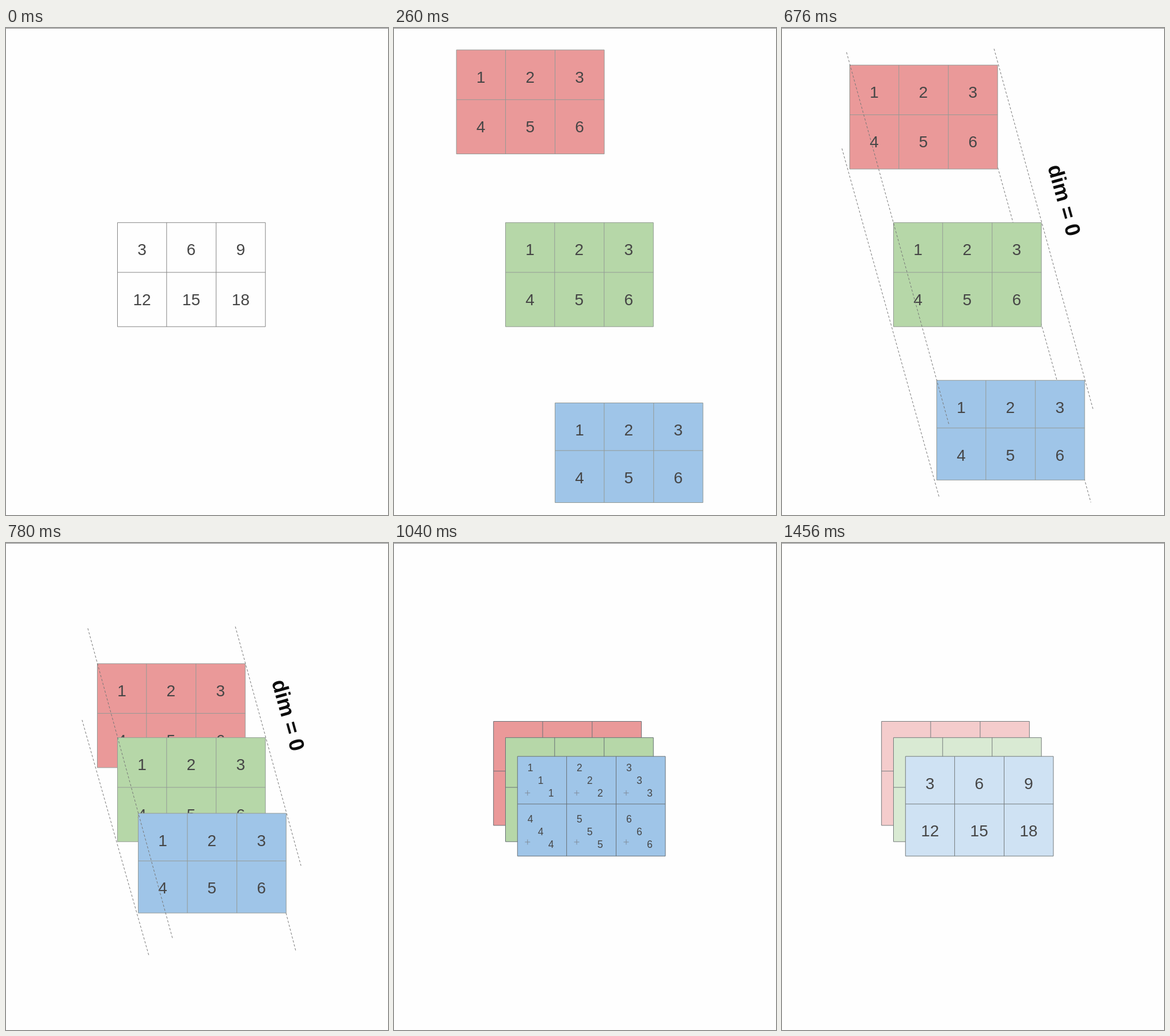
Recreate the animation shown at these times as an HTML page. Size 663x845 px, loop 1.56 s.

```html
<!DOCTYPE html>
<html lang="en">
<head>
<meta charset="utf-8">
<title>Sum over dim 0</title>
<style>
  html, body { margin: 0; width: 100%; height: 100%; overflow: hidden; background: #fefefe; }
  svg { display: block; width: 663px; height: 845px; }
  text { font: 28px "Liberation Sans", Arial, sans-serif; text-anchor: middle; fill: #464646; }
  .small { font-size: 17.5px; }
  .plus { stroke: #7f8c9a; stroke-width: 1; }
  .label { font-size: 36.5px; font-weight: bold; fill: #0c0c0c; }
  .dash { stroke: #777; stroke-width: 1; stroke-dasharray: 4 3; }
  .scene { visibility: hidden; animation: hold260 1560ms step-end infinite; }
  .scene.short { animation-name: hold130; }
  @keyframes hold260 { 0% { visibility: visible; } 16.6667%, 100% { visibility: hidden; } }
  @keyframes hold130 { 0% { visibility: visible; } 8.3333%, 100% { visibility: hidden; } }
</style>
</head>
<body>
<svg id="stage" viewBox="0 0 663 845"></svg>
<script>
const RED = '#ea9999', GREEN = '#b6d7a8', BLUE = '#9fc5e8';
const PALE = { [RED]: '#f4cccc', [GREEN]: '#d9ead3', [BLUE]: '#cfe2f3' };
const COLS = [0, 85.3, 171.2, 256.7];
const TALL = [0, 86.3, 180.5], LOW = [0, 82.7, 173];
const GREEN_AT = [193.5, 337.7];

const text = (x, y, value, cls = '') => `<text class="${cls}" x="${x}" y="${y}">${value}</text>`;
const dash = (x1, y1, x2, y2) => `<path class="dash" d="M${x1} ${y1}L${x2} ${y2}"/>`;

const single = step => (x, y, n) => text(x + 42.6, y + 56.5, n * step);

// Three copies of a digit down the diagonal, with a plus sign beside the last.
function addends(x, y, n, row) {
  const drop = row * 7;
  const px = x + 17.5, py = y + 63.5 + row * 2.5;
  return [0, 1, 2].map(i => text(x + 22.3 + 18 * i, y + 25.5 + drop + 22 * i, n, 'small')).join('') +
    `<path class="plus" d="M${px - 4.5} ${py}h9M${px} ${py - 4.5}v9"/>`;
}

function grid([x, y], fill, rows, cell, line) {
  const [w, h] = [COLS[3], rows[2]];
  let out = `<path fill="${fill}" stroke="${line}" d="M${x} ${y}h${w}v${h}h${-w}z` +
    `M${x + COLS[1]} ${y}v${h}M${x + COLS[2]} ${y}v${h}M${x} ${y + rows[1]}h${w}"/>`;
  for (let n = 1; n <= 6; n++) {
    const row = n > 3 ? 1 : 0;
    out += cell(x + COLS[(n - 1) % 3], y + rows[row], n, row);
  }
  return out;
}

function stack(red, blue, { line = '#949a96', cell = single(1), pale = false } = {}) {
  const tint = c => pale ? PALE[c] : c;
  const back = cell === addends || pale ? () => '' : cell;
  return grid(red, tint(RED), TALL, back, line) +
    grid(GREEN_AT, tint(GREEN), TALL, back, line) +
    grid(blue, tint(BLUE), LOW, cell, line);
}

const label = `<g transform="translate(490.5 298.7) rotate(74.5)">${text(0, 13, 'dim = 0', 'label')}</g>`;

const scenes = [
  [260, grid(GREEN_AT, 'none', TALL, single(3), '#858585')],
  [260, stack([108.3, 38], [279.5, 650.5])],
  [260, dash(367, 215, 536, 823) +
    stack([117.5, 64.3], [268.5, 611.3]) +
    dash(112, 42, 290, 689) + dash(368, 36, 540, 662) + dash(104, 209, 273, 815) + label],
  [130, dash(486, 642, 503, 708) +
    stack([158.5, 209.3], [229.5, 469]) +
    dash(142, 148, 289, 686) + dash(398, 145, 512, 560) + dash(132, 307, 248, 716) + label],
  [130, stack([175.3, 282.5], [212.3, 397], { line: '#747b7c' })],
  [260, stack([172.7, 309.5], [214.3, 370.2], { line: '#687076', cell: addends })],
  [260, stack([172.7, 309.5], [214.3, 370.2], { line: '#747b7c', cell: single(3), pale: true })]
];

let start = 0;
document.getElementById('stage').innerHTML = scenes.map(([hold, body]) => {
  const delay = start ? start - 1560 : 0;
  start += hold;
  return `<g class="scene${hold < 260 ? ' short' : ''}" style="animation-delay:${delay}ms">${body}</g>`;
}).join('') + '<path stroke="#8a8a8a" d="M0 .5h663"/>';
</script>
</body>
</html>
```
